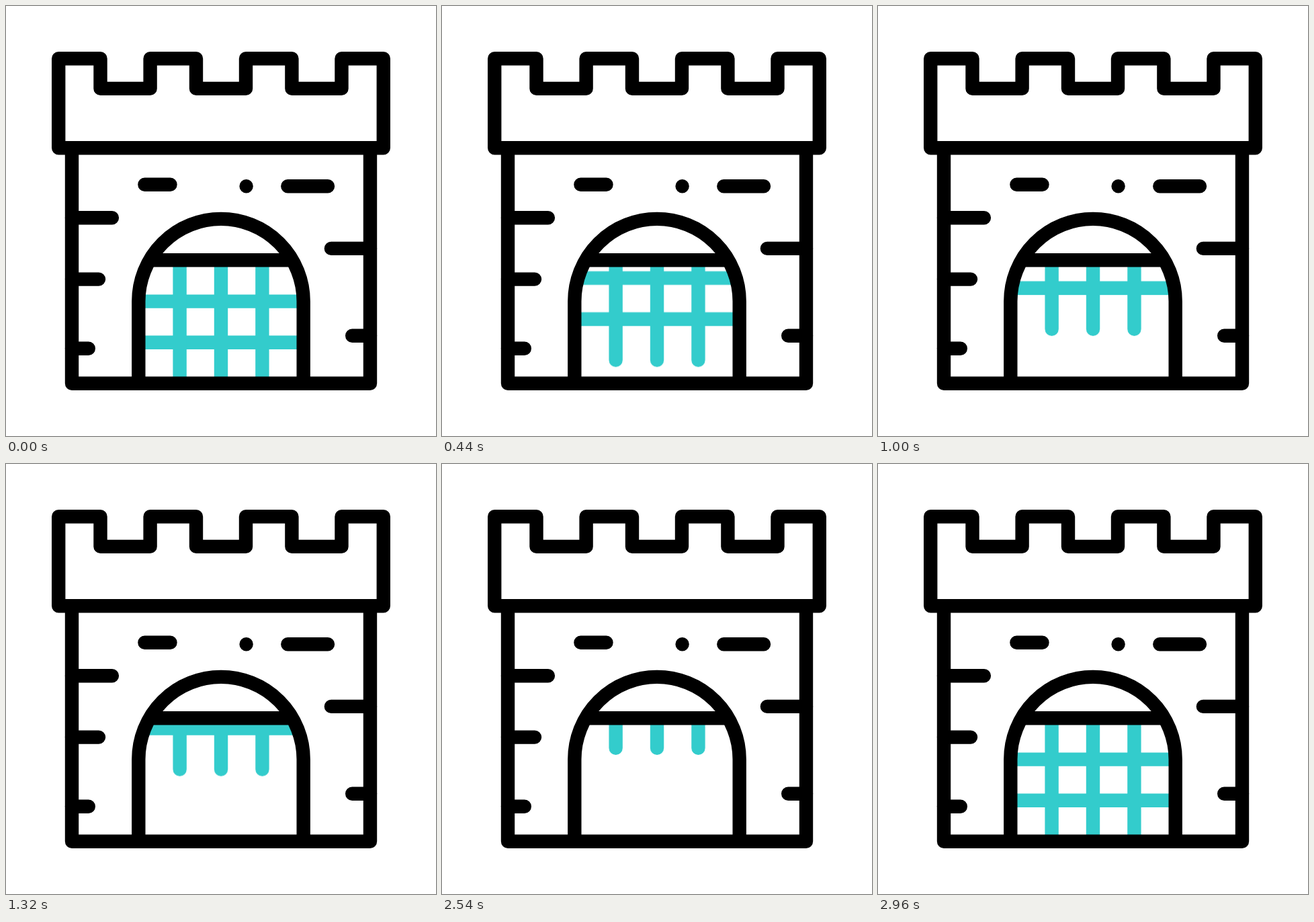
Recreate the animation shown at these times as an HTML page. Size 640 by 640 pixels, loop 3600 ms.

```html
<!DOCTYPE html>
<html lang="en">
<head>
<meta charset="utf-8">
<title>Castle gate</title>
<style>
  html, body { margin: 0; width: 100%; height: 100%; overflow: hidden; background: #fff; }
  svg { display: block; width: 100%; height: 100%; }
  path { fill: none; stroke-width: 20.4; }
  .wall { stroke: #000; stroke-linecap: round; stroke-linejoin: round; }
  .gate { stroke: #3cc; }
</style>
</head>
<body>
<svg viewBox="0 0 640 640">
  <clipPath id="opening"><rect x="190" y="380" width="260" height="190"/></clipPath>
  <g clip-path="url(#opening)">
    <g id="gate" class="gate">
      <path d="M204 439.6H436M204 500.8H436"/>
      <path stroke-linecap="round" d="M258.6 370V561.8M320 370V561.8M381.4 370V561.8"/>
    </g>
  </g>
  <g class="wall">
    <!-- battlements -->
    <path d="M78.2 78.2H140.5V122.9H214.6V78.2H283V122.9H357V78.2H425.4V122.9H499.5V78.2H561.8V211.3H78.2Z"/>
    <!-- tower, arch and beam -->
    <path d="M98 211.3V561.8H542V211.3"/>
    <path d="M197.3 561.8V439.6A122.7 122.7 0 0 1 442.7 439.6V561.8"/>
    <path stroke-linecap="butt" d="M214 378.2H426"/>
    <!-- stones -->
    <path d="M206.4 265.8H244.5M357.6 268.2h.01M419.3 268.2H479"/>
    <path d="M98 315.2H157.9M98 406.6H138M98 509.8H122.8M542 360.9H483.9M542 490.8H515.2"/>
  </g>
</svg>
<script>
  const LOOP = 3600, LIFT = -148.5;

  // [time in ms, gate offset, easing to the next step]
  const steps = [
    [0, 0, 'linear'],
    [20, 0, 'linear'],
    [1820, LIFT, 'linear'],
    [2520, LIFT, 'cubic-bezier(.33, .44, .67, .94)'],
    [2960, 0, 'linear'],
    [LOOP, 0, 'linear']
  ];

  document.getElementById('gate').animate(
    steps.map(([time, y, easing]) => ({
      offset: time / LOOP,
      transform: `translate(0px, ${y}px)`,
      easing
    })),
    { duration: LOOP, iterations: Infinity }
  );
</script>
</body>
</html>
```
